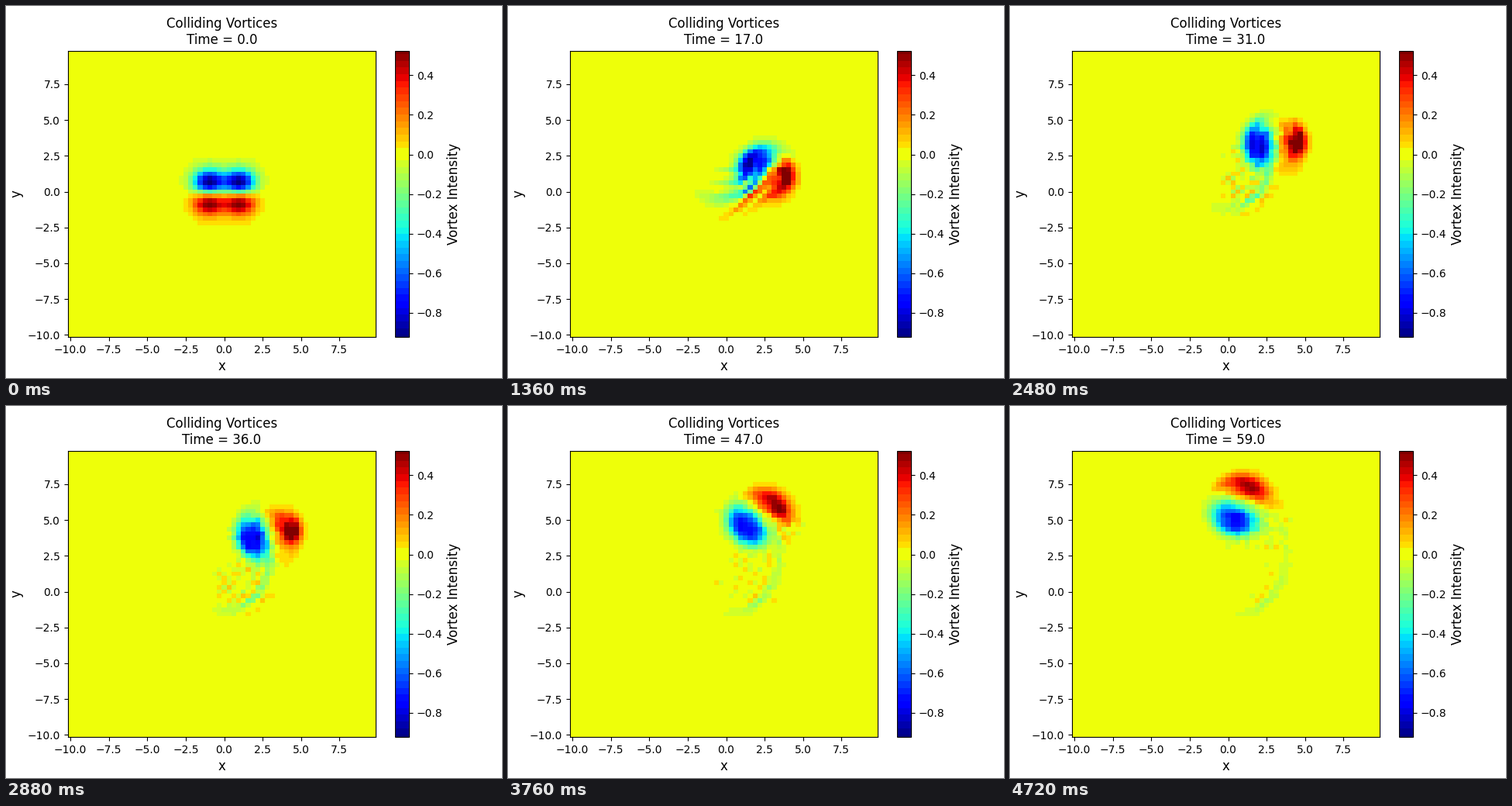
Recreate the animation shown at these times as a matplotlib script. Size 640 by 480 pixels, loop 4800 ms.

```python
import numpy as np
import matplotlib.pyplot as plt
from matplotlib.animation import FuncAnimation
from matplotlib.colors import ListedColormap

N, L, NU = 64, 10.0, 0.001
FRAMES, INTERVAL = 60, 80
SUBSTEPS = 10
DX = 2 * L / N

x = -L + DX * np.arange(N)
X, Y = np.meshgrid(x, x)

k = 2 * np.pi * np.fft.fftfreq(N, DX)
KX, KY = np.meshgrid(k, k)
K2 = KX**2 + KY**2
K2[0, 0] = 1.0


def diff(f, axis):
    return (np.roll(f, -1, axis) - np.roll(f, 1, axis)) / (2 * DX)


def laplacian(f):
    near = sum(np.roll(f, s, a) for s in (-1, 1) for a in (0, 1))
    return (near - 4 * f) / DX**2


def stream(w):
    psi = -np.fft.fft2(w) / K2
    psi[0, 0] = 0
    return np.fft.ifft2(psi).real


def rhs(w):
    psi = stream(w)
    advect = diff(psi, 1) * diff(w, 0) - diff(psi, 0) * diff(w, 1)
    return advect + NU * laplacian(w)


def rk4(w, dt):
    a = rhs(w)
    b = rhs(w + dt / 2 * a)
    c = rhs(w + dt / 2 * b)
    d = rhs(w + dt * c)
    return w + dt / 6 * (a + 2 * b + 2 * c + d)


def pair(y0):
    """Two equal round vortices side by side at height y0."""
    return sum(np.exp(-(X - x0)**2 - (Y - y0)**2) for x0 in (-1, 1))


def simulate():
    w = 0.8 * pair(-0.5) - 1.15 * pair(0.5)
    states = [w]
    for _ in range(FRAMES - 1):
        for _ in range(SUBSTEPS):
            w = rk4(w, 1 / SUBSTEPS)
        states.append(w)
    return states


def banded_jet(rest=163, width=6):
    """Jet in flat bands, with a double band around the resting level."""
    step = np.trunc((np.arange(256) - rest) / width)
    level = rest + width * step + width // 2 * np.sign(step)
    return ListedColormap(plt.get_cmap("jet")(np.clip(level, 0, 255).astype(int)))


states = simulate()

plt.rcParams["font.family"] = "DejaVu Sans"
fig, ax = plt.subplots(figsize=(6.4, 4.8), dpi=100)
mesh = ax.pcolormesh(X, Y, states[0], cmap=banded_jet(), shading="nearest",
                     vmin=states[0].min(), vmax=states[0].max())
bar = fig.colorbar(mesh, ax=ax)
bar.set_label("Vortex Intensity", fontsize=12)
ax.set_xlabel("x", fontsize=12)
ax.set_ylabel("y", fontsize=12)
title = ax.set_title("", fontsize=12)


def update(i):
    mesh.set_array(states[i])
    title.set_text(f"Colliding Vortices\nTime = {i:.1f}")
    return mesh, title


anim = FuncAnimation(fig, update, frames=FRAMES, interval=INTERVAL,
                     init_func=lambda: update(0), repeat=True, blit=False)
plt.show()
```
